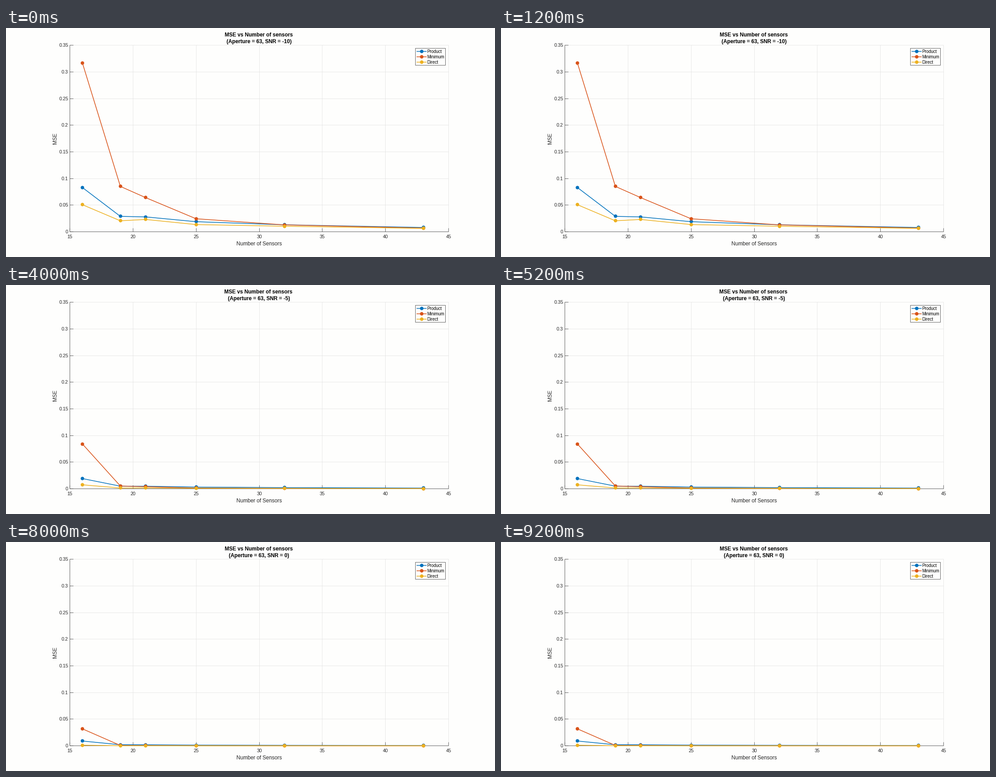
A matplotlib script that plays this animation: 1091x513 px, repeating every 10000 ms.

```python
import math

import matplotlib.pyplot as plt
from matplotlib.animation import FuncAnimation
from matplotlib.patches import Circle, Rectangle

W, H, DPI = 1091, 513, 64
PT = 72 / DPI  # points per pixel
LEFT, RIGHT, TOP, BOTTOM = 142.5, 987.5, 38.7, 456.6
PAPER, INK, GRID = "#fefefd", "#262626", "#dfdfdf"
HAIR, LINE, DOT = 0.7, 1.55, 3.9  # line widths and marker radius in pixels

SENSORS = [16, 19, 21, 25, 32, 43]
SNRS = [-10, -8, -5, -3, 0]


class Series:
    """MSE with the fewest sensors per SNR, and the tail at the lowest SNR."""

    def __init__(self, name, color, peaks, tail, power):
        self.name, self.color = name, color
        self.peaks, self.tail, self.power = peaks, tail, power

    def mse(self, i):
        # The tail falls as a power of the drop of the first point.
        fall = (self.peaks[i] / self.peaks[0]) ** self.power
        return [self.peaks[i]] + [v * fall for v in self.tail]


SERIES = [
    Series("Product", "#0072bd", [.083, .0424, .0192, .011, .009],
           [.029, .028, .019, .0132, .0081], 1.2),
    Series("Minimum", "#d95319", [.3163, .1873, .084, .058, .0318],
           [.0852, .0642, .0245, .013, .007], 2.1),
    Series("Direct", "#edb120", [.0508, .028, .0075, .0026, .0012],
           [.0207, .0232, .0136, .0105, .0064], 1.35),
]

plt.rcParams["font.family"] = "Liberation Sans"
fig = plt.figure(figsize=(W / DPI, H / DPI), dpi=DPI, facecolor=PAPER)
ax = fig.add_axes([0, 0, 1, 1])
ax.set(xlim=(0, W), ylim=(H, 0))
ax.axis("off")


def to_x(n):
    return LEFT + (n - 15) / 30 * (RIGHT - LEFT)


def to_y(v):
    return BOTTOM - v / 0.35 * (BOTTOM - TOP)


def crisp(v):
    return math.floor(v) + 0.5


def rule(x0, y0, x1, y1, color, z):
    ax.plot([x0, x1], [y0, y1], color=color, lw=HAIR * PT, zorder=z,
            snap=False, solid_capstyle="butt")


def label(x, y, s, size, ha="center", color=INK, **kw):
    return ax.text(x, y, s, fontsize=size * PT, ha=ha, va="baseline",
                   color=color, zorder=9, **kw)


def curve(x, y, color, z):
    return ax.plot(x, y, color=color, lw=LINE * PT, zorder=z, snap=False,
                   solid_capstyle="butt")[0]


def dot(x, y, color, z):
    return ax.add_patch(Circle((crisp(x), crisp(y)), DOT, fc=color, lw=0,
                               zorder=z))


def draw_axes():
    left, right, bottom, top = map(crisp, (LEFT, RIGHT, BOTTOM, TOP))
    for n in range(15, 50, 5):
        x = crisp(to_x(n))
        rule(x, top, x, bottom, GRID, 1)
        rule(x, bottom - 8, x, bottom, INK, 2)
        label(to_x(n), 471, str(n), 10.67)
    for k in range(8):
        y = crisp(to_y(k * 0.05))
        rule(left, y, right, y, GRID, 1)
        rule(left, y, left + 8, y, INK, 2)
        label(138.8, round(y + 3.6), f"{k * 0.05:.2g}", 10.67, "right")
    rule(left, top, left, bottom, INK, 2)
    rule(left, bottom, right, bottom, INK, 2)
    label(565, 487, "Number of Sensors", 11.73)
    label(113, 247.5, "MSE", 11.73, rotation=90, rotation_mode="anchor")


def draw_legend():
    ax.add_patch(Rectangle((913.5, 45.5), 67, 38, fc=PAPER, ec=INK,
                           lw=HAIR * PT, zorder=7, snap=False))
    for i, s in enumerate(SERIES):
        y = crisp(52 + 12.4 * i)
        curve([916, 938.5], [y, y], s.color, 8)
        dot(927, y, s.color, 8.5)
        label(939.6, round(y + 3.6), s.name, 9.6, "left", "black")


draw_axes()
draw_legend()
xs = [to_x(n) for n in SENSORS]
curves, dots = [], []
for rank, s in enumerate(SERIES):
    z = 3 + rank
    curves.append(curve(xs, [BOTTOM] * len(xs), s.color, z))
    dots.append([dot(x, BOTTOM, s.color, z + 0.5) for x in xs])
title = label(564.5, 19, "MSE vs Number of sensors", 11.73, color="black",
              weight="bold")
subtitle = label(564.8, 34, "", 11.73, color="black", weight="bold")


def update(i):
    snr = SNRS[i]
    for s, line, marks in zip(SERIES, curves, dots):
        ys = [to_y(v) for v in s.mse(i)]
        line.set_ydata(ys)
        for mark, x, y in zip(marks, xs, ys):
            mark.set_center((crisp(x), crisp(y)))
    title.set_x(563 if -10 < snr < 0 else 564.5)
    subtitle.set_text(f"(Aperture = 63, SNR = {snr})")


anim = FuncAnimation(fig, update, frames=len(SNRS), interval=2000,
                     repeat=True, repeat_delay=0, blit=False)
plt.show()
```
